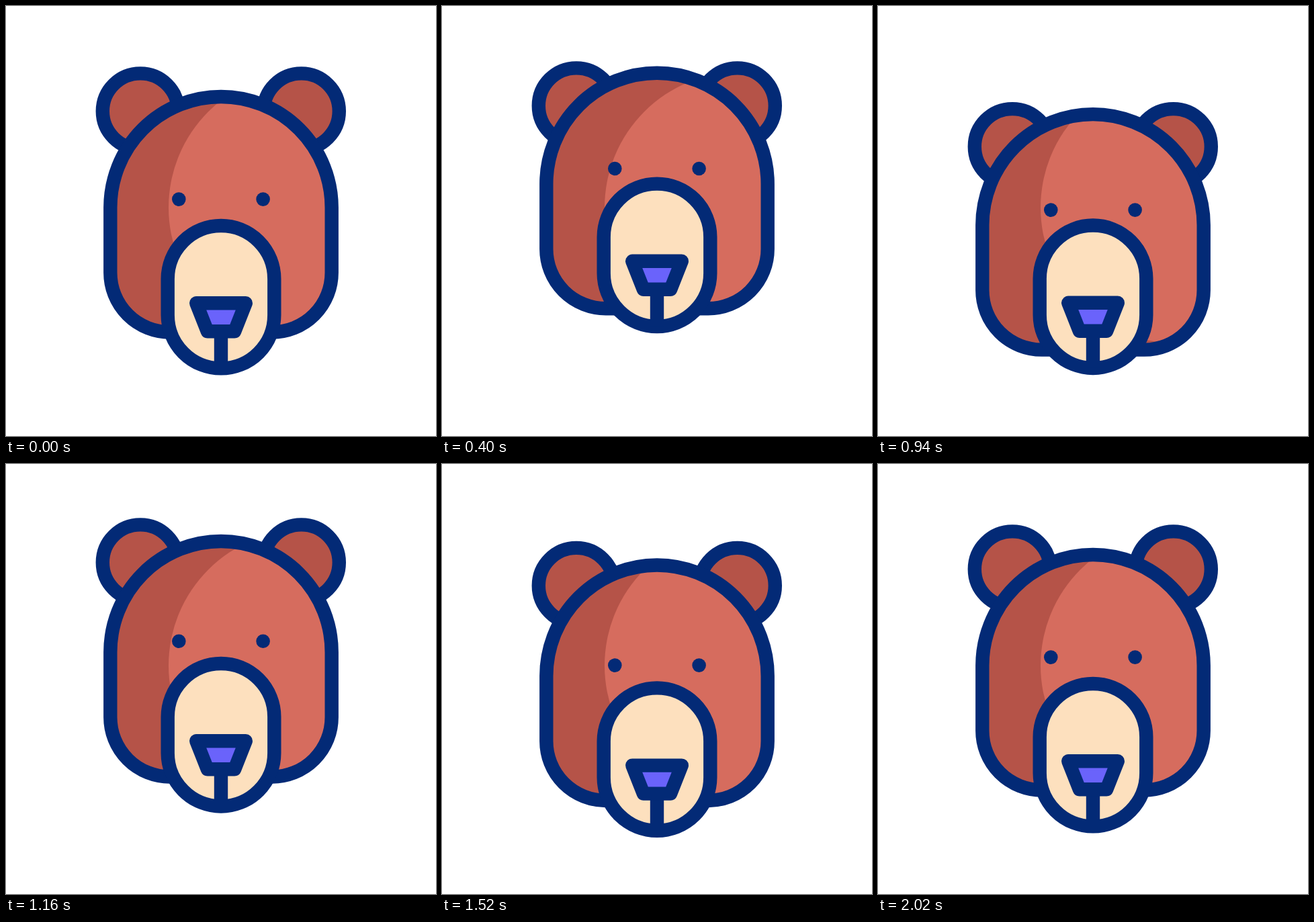
An HTML page that plays this animation: 640 px wide and 640 px high, repeating every 2400 ms.

```html
<!DOCTYPE html>
<html lang="en">
<head>
<meta charset="utf-8">
<title>Nodding bear</title>
<style>
  html, body { margin: 0; height: 100%; overflow: hidden; background: #fff; }
  svg { display: block; width: 100%; height: 100%; }
  .line { stroke: #032a76; stroke-width: 20.4; stroke-linejoin: round; }
  .ink { fill: #032a76; }
  .dark { fill: #b55348; }
  .light { fill: #d66c5e; }
  .cream { fill: #fde0be; }
  .nose { fill: #6a63fb; }
</style>
</head>
<body>
<svg viewBox="0 0 640 640">
  <defs>
    <path id="skull" d="M155.3 300a164.7 165 0 0 1 329.4 0V397a88.5 88.5 0 0 1-88.5 88.5H243.8a88.5 88.5 0 0 1-88.5-88.5Z"/>
    <clipPath id="face"><use href="#skull" data-part="head"/></clipPath>
  </defs>

  <g data-part="ears" class="line dark">
    <circle cx="200" cy="156.6" r="56.2"/>
    <circle cx="439.6" cy="156.6" r="56.2"/>
  </g>

  <!-- The lit area stays still while the head slides over it. -->
  <use href="#skull" data-part="head" class="dark"/>
  <g clip-path="url(#face)"><circle class="light" cx="444" cy="300" r="202"/></g>
  <use href="#skull" data-part="head" class="line" fill="none"/>

  <g data-part="eyes" class="ink">
    <circle cx="257.3" cy="287.6" r="10.3"/>
    <circle cx="382.6" cy="287.6" r="10.3"/>
  </g>

  <g data-part="snout" class="line">
    <rect class="cream" x="240.7" y="327" width="158.6" height="212.4" rx="79.3"/>
    <path d="M320 484V539"/>
    <path class="nose" d="M283.2 442.2H356.8L340.2 484.2H299.8Z"/>
  </g>
</svg>
<script>
  const LOOP = 2400;

  // [time in ms, vertical offset] at each turning point
  const earKeys = [[0, 0], [200, 29], [565, -35], [960, 53.2], [1270, -34], [1680, 53], [2020, 0]];
  const snoutKeys = [[0, 0], [360, -64], [808, 13.5], [1155, -30], [1507, 6.5], [1840, -20], [2020, 0]];

  function swing(keys, t) {
    const i = keys.findIndex(key => key[0] > t);
    if (i < 0) return 0;
    const [t0, y0] = keys[i - 1], [t1, y1] = keys[i];
    return y0 + (y1 - y0) * (1 - Math.cos(Math.PI * (t - t0) / (t1 - t0))) / 2;
  }

  function pose(t) {
    const ears = swing(earKeys, t);
    const snout = swing(snoutKeys, t);
    const tilt = snout - ears;
    const down = tilt > 0;
    return {
      ears,
      snout,
      head: ears + tilt * (down ? -0.07 : 0.5),
      eyes: ears + tilt * (down ? 0.93 : 0.69)
    };
  }

  const parts = document.querySelectorAll('[data-part]');
  const start = performance.now();

  function draw() {
    const offsets = pose((performance.now() - start) % LOOP);
    for (const part of parts)
      part.setAttribute('transform', `translate(0 ${offsets[part.dataset.part].toFixed(2)})`);
    requestAnimationFrame(draw);
  }
  draw();
</script>
</body>
</html>
```
